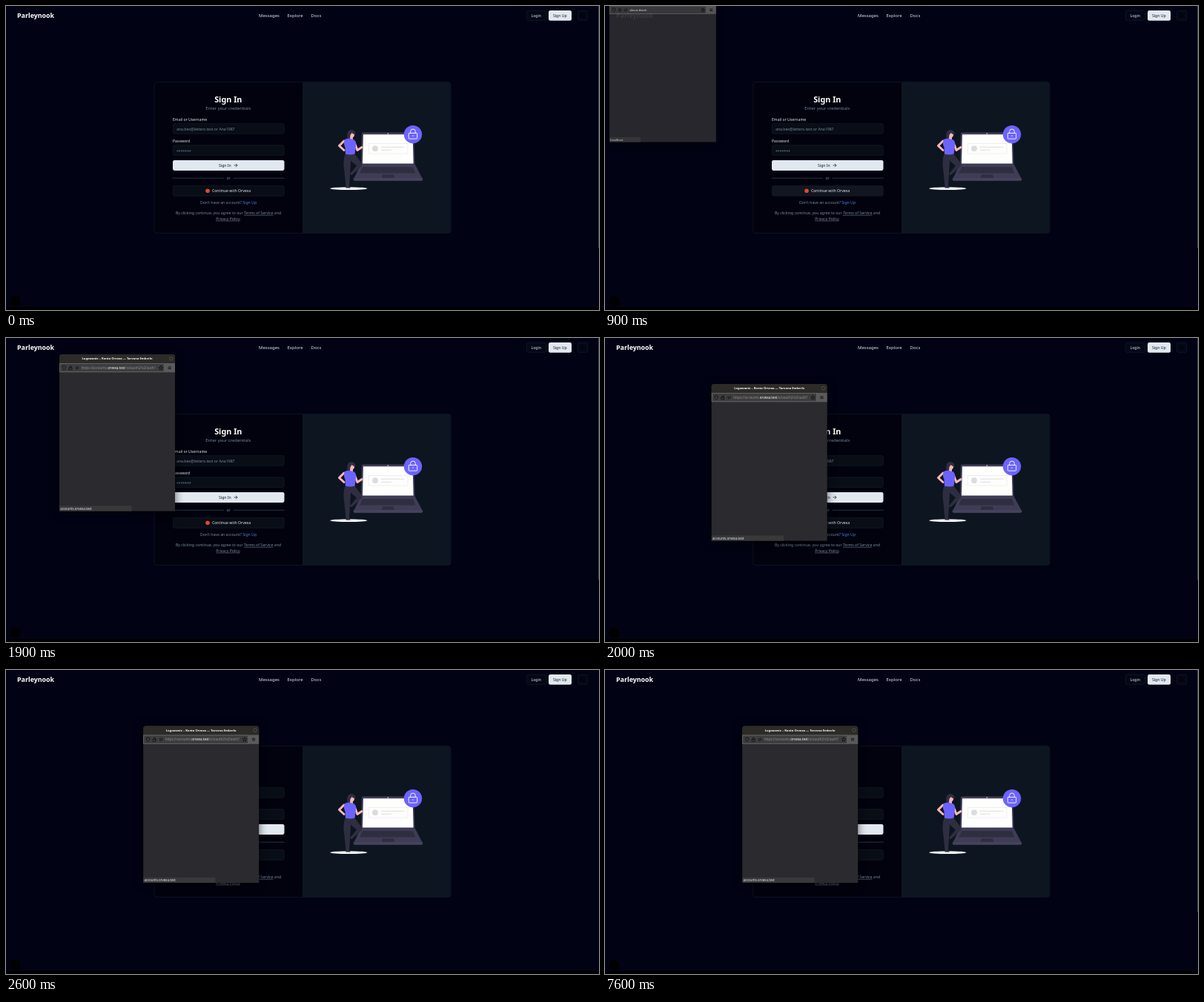
Recreate the animation shown at these times as an HTML page. Size 800x410 px, loop 8 s.

```html
<!DOCTYPE html>
<html lang="en">
<head>
<meta charset="utf-8">
<title>Sign in</title>
<style>
html, body { margin: 0; width: 100%; height: 100%; overflow: hidden; background: #010314; }
svg { display: block; width: 800px; height: 410px; font: 5.15px "Noto Sans", sans-serif; fill: #e2e8f0; }
.mid { text-anchor: middle; }
.nav { font-size: 6px; }
.muted { fill: #7c899f; }
.dark { fill: #10182a; }
.bold { font-weight: 700; }
.field { fill: #080d16; stroke: #151d28; stroke-width: .7; }
.line { fill: none; stroke: currentColor; stroke-width: .7; stroke-linecap: round; stroke-linejoin: round; }
.u { text-decoration: underline; }
#popup { filter: drop-shadow(0 2px 6px rgba(0, 0, 0, .6)); }
</style>
</head>
<body>
<svg viewBox="0 0 800 410">
  <rect width="800" height="410" fill="#010314"/>
  <rect y="406" width="800" height="4" fill="#000"/>

  <!-- header -->
  <text x="15" y="16" class="bold" font-size="8.87" fill="#fff">Parleynook</text>
  <g class="nav">
    <text x="341" y="15.1">Messages</text>
    <text x="379.5" y="15.1">Explore</text>
    <text x="411.5" y="15.1">Docs</text>
  </g>
  <rect x="702.3" y="6.3" width="26" height="13" rx="2.3" class="field" style="fill:#030716"/>
  <text x="715.2" y="14.9" class="mid">Login</text>
  <rect x="732" y="6" width="31" height="13.7" rx="2.3"/>
  <text x="747.3" y="14.9" class="mid dark">Sign Up</text>
  <rect x="771.3" y="6.3" width="13.4" height="13" rx="2.3" class="field" style="fill:#030716"/>
  <path d="M778 10.6a1.7 1.7 0 0 0 2.4 2.4a2.4 2.4 0 1 1-2.4-2.4z" class="line"/>

  <!-- card -->
  <rect x="200" y="102.7" width="400" height="203.6" rx="3.5" fill="#01020d"/>
  <path d="M400 102.7h196.500a3.500 3.500 0 0 1 3.500 3.500v196.600a3.500 3.500 0 0 1-3.500 3.500h-196.500z" fill="#0d1520"/>
  <rect x="200" y="102.700" width="400" height="203.600" rx="3.500" fill="none" stroke="#111925" stroke-width=".8"/>
  <text x="299.800" y="130" class="mid bold" font-size="10.800" fill="#fff">Sign In</text>
  <text x="299.800" y="139.700" class="mid muted" font-size="5.900">Enter your credentials</text>
  <text x="225" y="154.600">Email or Username</text>
  <rect x="225.300" y="158.700" width="150" height="13.500" rx="2.300" class="field"/>
  <text x="230" y="167.700" class="muted">ana.bex@letters.test or Ana1987</text>
  <text x="225" y="183.700">Password</text>
  <rect x="225.300" y="187.800" width="150" height="13.500" rx="2.300" class="field"/>
  <text x="230" y="198" class="muted">*******</text>
  <rect x="225" y="207.900" width="150.500" height="14" rx="2.300"/>
  <text x="287" y="216.800" class="dark">Sign In</text>
  <path d="M308 214.900h4m-1.900-1.900l1.900 1.900l-1.900 1.900" class="line" color="#10182a"/>
  <path d="M225 232.200h68.500M307 232.200h68.500" class="line" color="#3b4557"/>
  <text x="300" y="233.900" class="mid muted">or</text>
  <g id="button">
    <rect id="face" x="225.300" y="242.400" width="150" height="13.800" rx="2.300" class="field"/>
    <circle cx="272" cy="249.200" r="2.800" fill="#ea4335"/>
    <text x="278" y="251.200">Continue with Orvexa</text>
  </g>
  <text x="300" y="266.800" class="mid muted">Don't have an account? <tspan fill="#4b82e8">Sign Up</tspan></text>
  <text x="300" y="280.900" class="mid muted">By clicking continue, you agree to our <tspan class="u">Terms of Service</tspan> and</text>
  <text x="300" y="288.700" class="mid muted"><tspan class="u">Privacy Policy</tspan>.</text>

  <!-- laptop -->
  <path d="M481.500 170.500h67q1.500 0 1.600 1.500l1.400 41.500h-72.500l1-41.500q.1-1.500 1.500-1.500z" fill="#3f3d56"/>
  <path d="M482 173.200h66.700l.9 39.300h-68.600z" fill="#fefefd"/>
  <circle cx="515.300" cy="172" r=".7" fill="#fff"/>
  <path d="M479 213.200h72.500l10.700 20.200q.3 2.300-2 2.600h-89.400q-2.300-.3-2-2.600z" fill="#3f3d56"/>
  <path d="M481 217h68l3.500 8.500h-75.500z" fill="#2f2e41"/>
  <path d="M508 227.200h15l1.200 4.500h-17.500z" fill="#2f2e41"/>
  <path d="M469 233.300h93" class="line" color="#55536b"/>
  <rect x="489.500" y="185.500" width="52.500" height="13.500" fill="none" stroke="#e4e4e7" stroke-width=".6"/>
  <circle cx="498" cy="192.200" r="3.900" fill="#dcdce0"/>
  <path d="M506.500 190.200h30.500M506.500 194.300h13" class="line" color="#dcdce0" style="stroke-width:1.100"/>
  <circle cx="549" cy="173.200" r="12.200" fill="#6c63ff"/>
  <g class="line" color="#fff" style="stroke-width:.9">
    <rect x="543.300" y="171.500" width="11.400" height="7.600" rx=".8"/>
    <path d="M545.700 171.500v-2.200a3.300 3.300 0 0 1 6.600 0v2.200M549 174.600v.8"/>
  </g>

  <!-- figure -->
  <ellipse cx="462.300" cy="246.200" rx="25" ry="1.900" fill="#f4f4f5"/>
  <g class="line" color="#ffb8b8" style="stroke-width:3">
    <path d="M456 182l-6.500 6.500l6.500 6M470 184l4 10.500l6-4"/>
  </g>
  <path d="M462 173h6v7h-5z" fill="#ffb8b8"/>
  <circle cx="466" cy="173.500" r="4" fill="#ffb8b8"/>
  <path d="M460.200 178.500q-1-11.500 5.500-11.500q6 0 5.800 6.500q-4-1-5-2.500q-1 2-2 3l-.5 5z" fill="#2f2e41"/>
  <path d="M457 180q4-2 8-1l5 1.500q3 3 2 8l-1.500 12q-7 2.500-12.500 0l-.5-10q-3-6-.5-10.500z" fill="#6c63ff"/>
  <path d="M457.500 199.500q7 2 13 0l9.500 13q1.500 3-1.500 5l-12.500 11l-2-2l9-11l-8-7l-.5 12l-1.500 22.500h-4.500l-2-20q-2.500-14 1-23.500z" fill="#2f2e41"/>
  <path d="M458.500 242.500h4l2.500 3h-6.500z" fill="#2f2e41"/>

  <circle cx="12.300" cy="398" r="7" fill="#000"/>
  <rect id="scrollbar" x="799" width="1" height="326" fill="#3a4152"/>

  <!-- popup window -->
  <g id="popup">
    <path d="M0 24.500V3.500q0-3.500 3.500-3.500h149q3.500 0 3.500 3.500v208h-156z" fill="#2a2a2f"/>
    <path d="M0 12V3.500q0-3.500 3.500-3.500h149q3.500 0 3.500 3.500v8.500z" fill="#2c2b28"/>
    <text x="78" y="7" class="mid bold" font-size="4.100" fill="#fff">Logowanie – Konta Orvexa — Tarvona Emberlo</text>
    <circle cx="150.800" cy="5.700" r="2.700" fill="#45443f"/>
    <path d="M150 4.900l1.600 1.600m0-1.600l-1.600 1.600" class="line"/>
    <rect y="12" width="156" height="12.300" fill="#5b5a5b"/>
    <rect x=".6" y="12.600" width="141" height="11.100" fill="#3d3c3e" stroke="#777470" stroke-width=".5"/>
    <rect id="hover" x="132" y="13.500" width="9.200" height="9.300" rx="1" fill="#77767a"/>
    <g class="line" style="stroke-width:.6">
      <path d="M6.500 15.700l2.200.8q.2 3.300-2.200 4.600q-2.400-1.300-2.200-4.600z"/>
      <path id="lock" d="M13.400 18h3.600v2.800h-3.600zM14 18v-1a1.200 1.200 0 0 1 2.400 0v1"/>
      <path id="info" d="M15.200 16.100a2.100 2.100 0 1 0 .01 0M15.200 18v1.200"/>
      <path d="M22 17.300h4l-1-1M26 19.300h-4l1 1"/>
      <path d="M136.800 15.600l.8 1.800l1.900.2l-1.400 1.300l.4 1.900l-1.700-1l-1.700 1l.4-1.900l-1.400-1.300l1.900-.2z"/>
      <path d="M147 16.800h3.600m-3.600 1.400h3.600m-3.600 1.400h3.600"/>
    </g>
    <svg x="29.500" y="12" width="103" height="12" overflow="hidden" style="width:103px;height:12px;font-size:4.500px">
      <text id="blank" y="7.800">about:blank</text>
      <text id="url" y="7.800" fill="#8f8e92">https://accounts.<tspan fill="#fff">orvexa.test</tspan>/o/oauth2/v2/auth?</text>
    </svg>
    <rect id="statusBox" y="204.300" height="7.200" fill="#39393a"/>
    <text id="status" x="1.200" y="209.600" font-size="4.400"></text>
  </g>
</svg>
<script>
const $ = id => document.getElementById(id);
const show = (id, on) => $(id).style.opacity = +on;

// Linear interpolation through rows of [time, ...values]
function track(t, rows) {
  const next = rows.findIndex(row => row[0] > t);
  if (next === 0) return rows[0].slice(1);
  if (next < 0) return rows.at(-1).slice(1);
  const a = rows[next - 1], b = rows[next];
  const k = (t - a[0]) / (b[0] - a[0]);
  return a.slice(1).map((v, i) => v + (b[i + 1] - v) * k);
}

const scrollbar = [[0, 1], [400, 0], [700, 0], [900, 1], [2300, 1], [2600, 0], [7300, 0], [7600, 1]];
const hover = [[0, 0], [400, 1], [1200, 1], [1400, 0]];
const buttonScale = [[0, 1], [400, 1.05], [700, 1.05], [900, 1], [1100, 1.05], [1200, 1.05], [1400, 1]];
const starHover = [[7200, 0], [7300, 1], [7400, 1], [7600, 0]];
// time, x, y, scale, opacity
const popup = [
  [800, 12, -6, .84, .4], [900, 6, -11.5, .922, .93], [1000, 1.5, -24, .98, 1], [1100, 0, -28.5, 1, 1],
  [1800, 0, -28.5, 1, 1], [1900, 72, 22, 1, 1], [2000, 143.700, 62, 1, 1], [2100, 176, 72, 1, 1], [2200, 185.200, 75.500, 1, 1]
];

function draw(t) {
  show('scrollbar', track(t, scrollbar)[0]);
  const [lit] = track(t, hover), [grow] = track(t, buttonScale);
  $('face').style.fill = `rgb(${8 + 9 * lit}, ${13 + 9 * lit}, ${22 + 10 * lit})`;
  $('button').setAttribute('transform', `translate(300.300 249.300) scale(${grow}) translate(-300.300 -249.300)`);

  const [x, y, scale, opacity] = track(t, popup);
  $('popup').setAttribute('transform', `translate(${x} ${y}) scale(${scale})`);
  show('popup', t < 800 ? 0 : opacity);
  const loaded = t >= 1800;
  show('blank', !loaded);
  show('info', !loaded);
  show('url', loaded);
  show('lock', loaded);
  show('hover', track(t, starHover)[0]);
  $('statusBox').setAttribute('width', loaded ? 97.500 : 45.500);
  $('status').textContent = !loaded ? 'localhost'
    : t < 1900 ? 'Transferring data from accounts.orvexa.test…' : 'accounts.orvexa.test';
}

function tick() {
  draw(Math.floor(performance.now() % 8000 / 100) * 100);
  requestAnimationFrame(tick);
}
tick();
</script>
</body>
</html>
```
